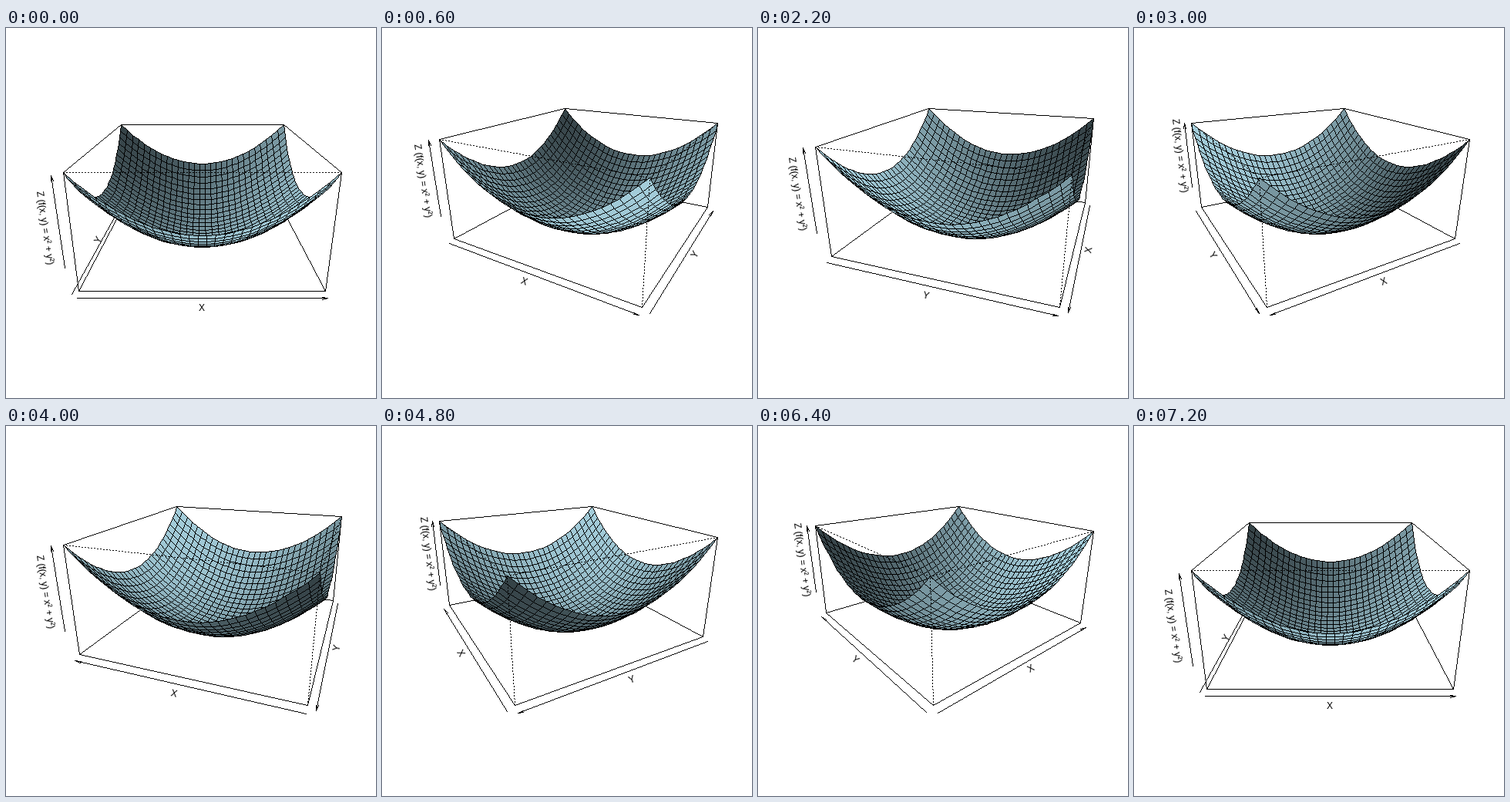
These frames come from a looping animation (480x480 px, 7.3 s). A matplotlib script:

```python
import itertools
import math

import matplotlib.pyplot as plt
import numpy as np
from matplotlib.animation import FuncAnimation

SIZE = 480
FRAMES = 73
STEP_DEG = 5
N = 30

# Camera and plot region (pixels, y down)
PHI = math.radians(20)
EXPAND = 0.5
EYE = 2 + math.sqrt(3)
LEFT, RIGHT, TOP, BOTTOM = 59.04, 449.76, 59.04, 406.56
PAD = 1.08

# Light and colour
LIGHT = np.array([-1, 1, 0]) / math.sqrt(2)
BASE = np.array([173, 216, 230])
SHADE = 0.5
BLACK = (0, 0, 0, 255)

TICK = 0.06
BASELINE = 6.3

# Bowl z = x^2 + y^2, with z mapped to [-1, 1]
axis = np.linspace(-1, 1, N)
X, Y = np.meshgrid(axis, axis, indexing="ij")
Z = X**2 + Y**2
Z_MID, Z_HALF = (Z.max() + Z.min()) / 2, (Z.max() - Z.min()) / 2
Z = (Z - Z_MID) / Z_HALF
SURFACE = np.stack([X, Y, Z], axis=-1)
Z_START = (0.5 - Z_MID) / Z_HALF

# Cube corners are numbered with bits x=4, y=2, z=1
CORNERS = np.array(list(itertools.product((-1, 1), repeat=3)), float)
FACES = [(0, 1, 5, 4), (2, 6, 7, 3), (0, 2, 3, 1),
         (4, 5, 7, 6), (0, 4, 6, 2), (1, 3, 7, 5)]
FLOOR = [0, 4, 2, 6]


def corners_of(grid):
    """The four corners of every cell, one row per cell."""
    quads = np.stack([grid[:-1, :-1], grid[1:, :-1],
                      grid[1:, 1:], grid[:-1, 1:]], axis=2)
    return quads.reshape((-1, 4) + grid.shape[2:])


def facet_colors():
    a, b, c, d = np.moveaxis(corners_of(SURFACE * (1, 1, EXPAND)), 1, 0)
    normal = np.cross(b - d, c - a)
    normal /= np.linalg.norm(normal, axis=1, keepdims=True)
    shade = (0.5 * (normal @ LIGHT + 1)) ** SHADE
    rgba = np.full((len(shade), 4), 255, np.uint8)
    rgba[:, :3] = shade[:, None] * BASE
    return rgba


COLORS = facet_colors()


def view(points, theta):
    """Perspective x, y (y up) and the depth divisor."""
    x, y, z = np.moveaxis(np.asarray(points, float), -1, 0)
    z = z * EXPAND
    c, s = math.cos(theta), math.sin(theta)
    near = x * s - y * c
    w = EYE - z * math.sin(PHI) - near * math.cos(PHI)
    up = z * math.cos(PHI) - near * math.sin(PHI)
    return np.stack([(x * c + y * s) / w, up / w], axis=-1), w


def make_mapper(theta):
    """Fit the turned box to the plot region; return points -> pixels."""
    box, _ = view(CORNERS, theta)
    lo, hi = box.min(axis=0), box.max(axis=0)
    width, height = hi - lo
    scale = min((RIGHT - LEFT) / width, (BOTTOM - TOP) / height) / PAD
    mid = (lo + hi) / 2
    center = np.array([(LEFT + RIGHT) / 2, (TOP + BOTTOM) / 2])

    def to_px(points):
        flat, _ = view(points, theta)
        return center + (flat - mid) * (scale, -scale)

    return to_px


def split_edges(px):
    """Box edges behind the surface, and those only on facing sides."""
    far, near = set(), set()
    for face in FACES:
        d, e = px[face[1]] - px[face[0]], px[face[2]] - px[face[1]]
        facing = d[0] * e[1] - d[1] * e[0] > 0
        pairs = zip(face, face[1:] + face[:1])
        (near if facing else far).update(tuple(sorted(p)) for p in pairs)
    return sorted(far), sorted(near - far)


def arrow(start, tip, length=7.2, angle=10):
    back = math.atan2(start[1] - tip[1], start[0] - tip[0])
    ends = [tip + length * np.array([math.cos(back + a), math.sin(back + a)])
            for a in (math.radians(angle), -math.radians(angle))]
    return [(start, tip), (ends[0], tip), (ends[1], tip)]


def label_angle(p, q):
    if p[0] > q[0]:
        p, q = q, p
    return math.atan2(p[1] - q[1], q[0] - p[0])


def axis_ends(px):
    """Start, end and outward direction of the X, Y and Z axes."""
    floor = np.round(px[FLOOR], 6)
    sx, sy, _ = CORNERS[FLOOR[int(np.argmax(floor[:, 1]))]]
    zx, zy, _ = CORNERS[FLOOR[int(np.argmin(floor[:, 0]))]]
    return [((-1, sy, -1), (1, sy, -1), (0, sy, -1)),
            ((sx, -1, -1), (sx, 1, -1), (sx, 0, -1)),
            ((zx, zy, Z_START), (zx, zy, 1), (zx, zy, 0))]


def line_pixels(a, b):
    """Pixels of one-pixel-wide lines; short lines repeat their last pixel."""
    a, b = np.round(a), np.round(b)
    steps = np.abs(b - a).max(axis=-1)[..., None]
    t = np.minimum(np.arange(steps.max() + 1) / np.maximum(steps, 1), 1)
    path = a[..., None, :] + t[..., None] * (b - a)[..., None, :]
    return np.floor(path + 0.5).astype(int)


def fill_pixels(quads):
    """Candidate pixels of each quad and whether they lie inside it."""
    lo = quads.min(axis=1)
    span = np.arange((quads.max(axis=1) - lo).max() + 1)
    block = np.stack(np.meshgrid(span, span), axis=-1).reshape(-1, 2)
    pixels = (lo[:, None] + block).astype(int)
    x, y = pixels[..., 0], pixels[..., 1]
    inside = np.zeros(x.shape, bool)
    for i in range(4):
        (ax_, ay), (bx, by) = quads[:, i - 1].T[..., None], quads[:, i].T[..., None]
        slope = (bx - ax_) / np.where(by == ay, 1, by - ay)
        crosses = (ay <= y) != (by <= y)
        inside ^= crosses & (x < ax_ + (y - ay) * slope)
    return pixels, inside


def paint(canvas, pixels, color):
    canvas[pixels[..., 1], pixels[..., 0]] = color


def paint_lines(canvas, segments, dotted=False):
    a, b = np.moveaxis(np.array(segments), 1, 0)
    pixels = line_pixels(a, b)
    if dotted:
        pixels = pixels[:, np.arange(pixels.shape[1]) % 4 < 2]
    paint(canvas, pixels, BLACK)


def paint_quads(canvas, quads, colors):
    """Fill and outline the quads in the given order."""
    quads = np.round(quads)
    pixels, inside = fill_pixels(quads)
    border = line_pixels(quads, np.roll(quads, -1, axis=1))
    border = border.reshape(len(quads), -1, 2)
    keep = np.hstack([inside, np.ones(border.shape[:2], bool)])
    rgba = np.empty(keep.shape + (4,), np.uint8)
    rgba[:] = BLACK
    rgba[:, :inside.shape[1]] = colors[:, None]
    paint(canvas, np.hstack([pixels, border])[keep], rgba[keep])


plt.rcParams["font.family"] = "Liberation Sans"
fig = plt.figure(figsize=(SIZE / 72, SIZE / 72), dpi=72, facecolor="white")
ax = fig.add_axes([0, 0, 1, 1])
ax.axis("off")
picture = ax.imshow(np.zeros((SIZE, SIZE, 4), np.uint8), aspect="auto",
                    interpolation="nearest", zorder=2)
labels = [ax.text(0, 0, text, fontsize=12, color="black", ha="center",
                  va="baseline", rotation_mode="anchor", zorder=1)
          for text in ("X", "Y", "Z (f(x, y) = x² + y²)")]


def draw(frame):
    theta = math.radians(frame * STEP_DEG % 360)
    to_px = make_mapper(theta)
    box = to_px(CORNERS)
    far, near = split_edges(box)
    lines = [box[list(edge)] for edge in far]

    for label, (start, end, out) in zip(labels, axis_ends(box)):
        start, end, out = map(np.array, (start, end, out))
        p, q = to_px([start + TICK * out, end + TICK * out])
        lines += arrow(p, q)
        x, y = to_px((start + end) / 2 + 2 * TICK * out) - 1
        a = label_angle(p, q)
        label.set_position((x + BASELINE * math.sin(a),
                            y + BASELINE * math.cos(a)))
        label.set_rotation(math.degrees(a))

    # Paint far cells first, judged on a flat sheet
    _, w = view(SURFACE * (1, 1, 0), theta)
    order = np.argsort(-np.round(corners_of(w).max(axis=1), 9), kind="stable")

    canvas = np.zeros((SIZE, SIZE, 4), np.uint8)
    paint_lines(canvas, lines)
    paint_quads(canvas, corners_of(to_px(SURFACE))[order], COLORS[order])
    paint_lines(canvas, [box[list(edge)] for edge in near], dotted=True)
    picture.set_data(canvas)
    return [picture, *labels]


anim = FuncAnimation(fig, draw, frames=FRAMES, interval=100,
                     repeat=True, repeat_delay=0, blit=False)
plt.show()
```
